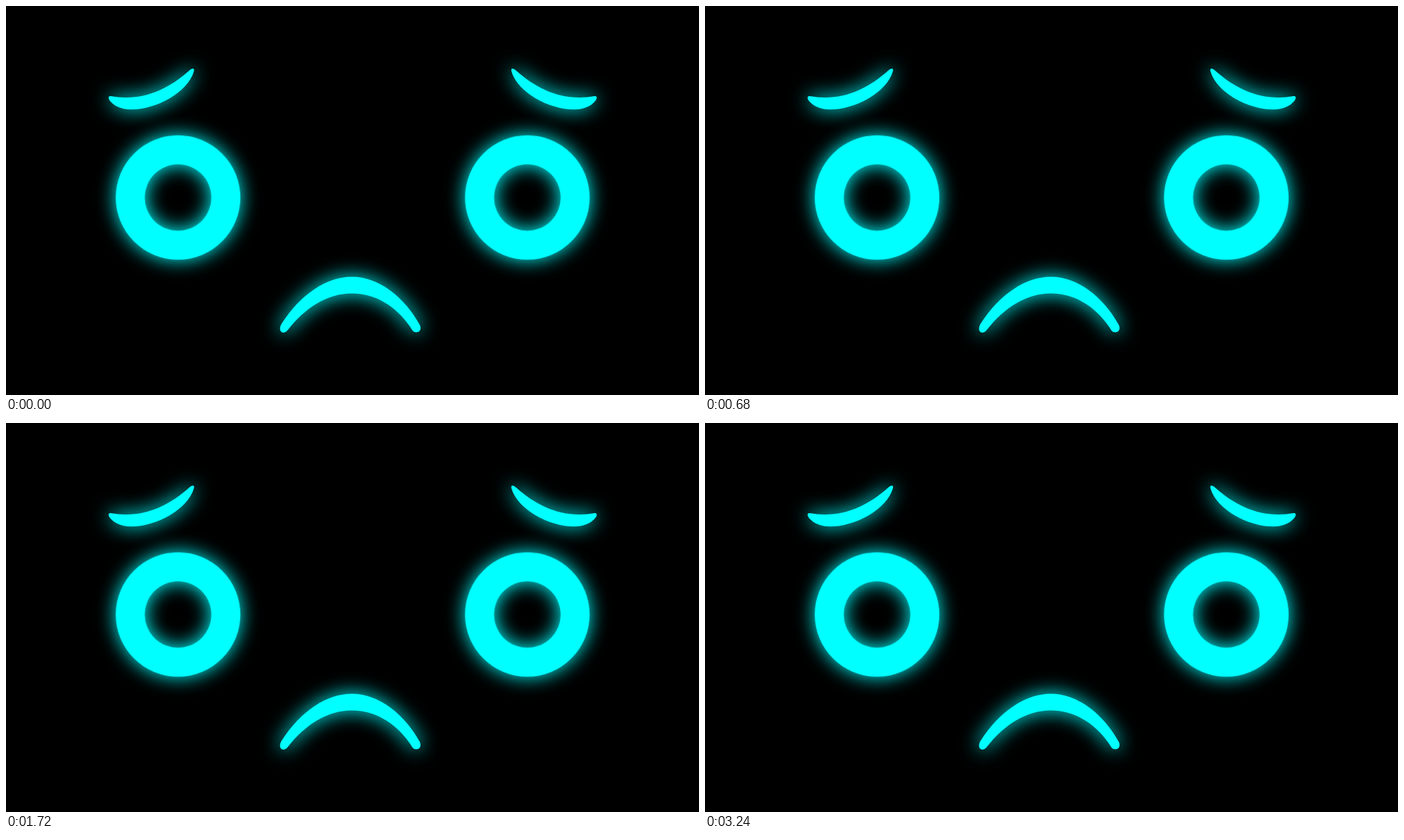
An HTML page with a canvas that plays this animation: 998 by 561 pixels, repeating every 4000 ms.

```html
<!DOCTYPE html>
<html lang="en">
<head>
<meta charset="utf-8">
<title>Sad face</title>
<style>
html, body { margin: 0; width: 100%; height: 100%; overflow: hidden; background: #000; }
canvas { display: block; width: 998px; height: 561px; }
</style>
</head>
<body>
<canvas id="stage" width="998" height="561"></canvas>
<script>
const W = 998, H = 561, LOOP = 4000, STEP = 40;
const CYAN = '#0ff', BLUR = 28;
const AXIS = 499.25;
const BLINKS = [0, 440, 1480, 3000], BLINK_MS = 240;
const EYE = { x: 247.75, y: 276.25, outer: 89.6, inner: 48, lid: 280.4 };

const brow = new Path2D(
  'M151 130C195 138 233 121 264 93C268.5 89 272 89.5 270.5 94.5' +
  'C262 124 217 149.5 180 149.3C163 149 153 142 148.8 135.5' +
  'C146.5 131 148.5 129.6 151 130Z');
const mouth = new Path2D(
  'M397 458C425 415 462 390.5 498 390.5C537 390.5 574 420 596 460' +
  'C598.5 466 596 470.5 591 470.5C586 470.5 585 467 581.5 462' +
  'C560 431 530 414.5 498 414.5C463 414.5 431 435 406 467' +
  'C403 471 399 472 396.5 470C393.5 467 394.5 462 397 458Z');
const ring = new Path2D();
ring.arc(0, 0, EYE.outer, 0, Math.PI * 2);
ring.moveTo(EYE.inner, 0);
ring.arc(0, 0, EYE.inner, 0, Math.PI * 2, true);

const ctx = document.getElementById('stage').getContext('2d');

function fillGlow(c, path) {
  c.fillStyle = CYAN;
  c.shadowColor = CYAN;
  c.shadowBlur = BLUR;
  c.fill(path);
  c.shadowBlur = 0;
}

// The eye's halo is drawn once so that it can be squashed with the eye.
const R = 160;
const halo = document.createElement('canvas');
halo.width = halo.height = R * 2;
const haloCtx = halo.getContext('2d');
haloCtx.translate(R, R);
fillGlow(haloCtx, ring);
// Keep only the light outside the ring, leaving its edge to the sharp shape.
haloCtx.globalCompositeOperation = 'destination-out';
haloCtx.fill(ring);
haloCtx.globalCompositeOperation = 'destination-over';
haloCtx.globalAlpha = 0.5;
haloCtx.lineWidth = 1;
haloCtx.strokeStyle = CYAN;
haloCtx.stroke(ring);

// How far the lids have come down: 0 is open.
function closure(t) {
  for (const start of BLINKS) {
    const k = (t - start) / BLINK_MS;
    if (k > 0 && k < 1) {
      const u = 1 - Math.abs(2 * k - 1);
      return 0.94 * u * (1.2 - 0.2 * u);
    }
  }
  return 0;
}

function drawSide(d) {
  ctx.save();
  ctx.translate(210, 120 + 9.2 * d);
  ctx.rotate(-0.034 * d);
  ctx.translate(-210, -120);
  fillGlow(ctx, brow);
  ctx.restore();

  ctx.save();
  ctx.translate(EYE.x, EYE.lid);
  ctx.scale(1, 1 - d);
  ctx.translate(0, EYE.y - EYE.lid);
  ctx.drawImage(halo, -R, -R);
  ctx.fillStyle = CYAN;
  ctx.fill(ring);
  ctx.restore();
}

function draw(t) {
  const d = closure(t);
  ctx.fillStyle = '#000';
  ctx.fillRect(0, 0, W, H);
  drawSide(d);
  ctx.save();
  ctx.translate(2 * AXIS, 0);
  ctx.scale(-1, 1);
  drawSide(d);
  ctx.restore();
  fillGlow(ctx, mouth);
}

const begin = performance.now();
function tick() {
  const t = (performance.now() - begin) % LOOP;
  draw(Math.floor(t / STEP + 0.01) * STEP);
  requestAnimationFrame(tick);
}
draw(0);
requestAnimationFrame(tick);
</script>
</body>
</html>
```
